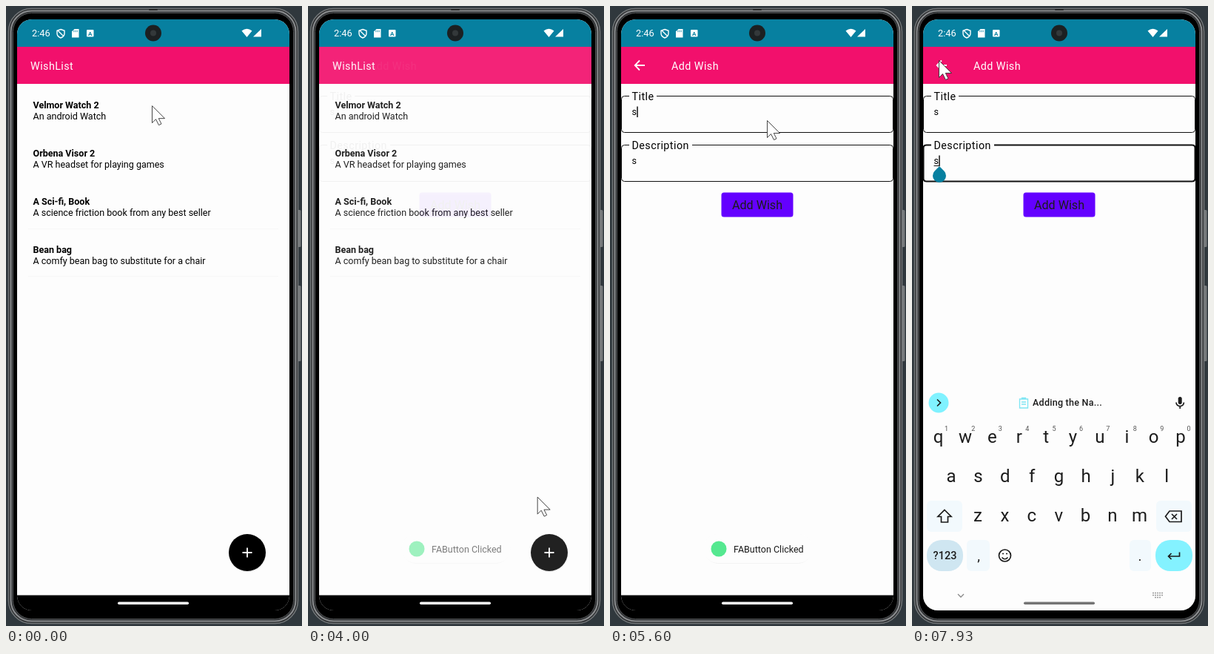
Write an HTML page that moves like this. It is 400 px wide and 836 px high and loops after 8000 ms.

```html
<!DOCTYPE html>
<html lang="en">
<head>
<meta charset="utf-8">
<title>Wish list app</title>
<style>
html, body { margin: 0; width: 100%; height: 100%; overflow: hidden; background: #30383d; }
svg { display: block; width: 400px; height: 836px; font: 12.53px Roboto, sans-serif; }
.body { font-size: 14.3px; letter-spacing: .45px; }
.bar { fill: #f2106c; }
.teal { fill: #0780a0; }
.line { fill: none; stroke: #111; }
.icon { fill: none; stroke: #1c1c1c; stroke-width: 1.7; }
.key { font-size: 24px; text-anchor: middle; fill: #1c1c1c; }
.hint { font-size: 9px; text-anchor: middle; fill: #555; }
</style>
</head>
<body>
<svg viewBox="0 0 400 836">
  <defs><clipPath id="screen"><rect x="15" y="18" width="368" height="797" rx="20"/></clipPath></defs>

  <!-- phone body -->
  <g fill="#777b7d">
    <rect x="393" y="275" width="5.5" height="50" rx="1.5"/>
    <rect x="393" y="377" width="5.5" height="102" rx="1.5"/>
  </g>
  <rect x="3.5" y="3.5" width="391" height="829" rx="31" fill="#242628" stroke="#74787a" stroke-width="1.5"/>
  <rect x="6.5" y="6.5" width="385" height="823" rx="28" fill="#303234" stroke="#8a8c8e" stroke-width="2"/>
  <rect x="9.5" y="9.5" width="379" height="817" rx="25" fill="#000" stroke="#505254"/>
  <rect x="193" y="4" width="12" height="2" rx="1" fill="#222"/>

  <g clip-path="url(#screen)">
    <rect x="15" y="18" width="368" height="797" fill="#fdfdfd"/>
    <g id="list">
      <rect x="15" y="55" width="368" height="740" fill="#fdfdfd"/>
      <rect class="bar" x="15" y="55" width="368" height="50"/>
      <text class="body" x="33" y="85.5" fill="#fff">WishList</text>
      <g id="wishes"></g>
      <path d="M30 300.5H368M30 364.5H368" stroke="#f7f7f7"/>
      <circle cx="326.500" cy="738.500" r="25" fill="#eee"/>
      <circle cx="326" cy="737" r="25"/>
      <path d="M319.5 737h13M326 730.5v13" stroke="#fff" stroke-width="1.8"/>
    </g>
    <g id="form">
      <rect x="15" y="55" width="368" height="740" fill="#fdfdfd"/>
      <rect class="bar" x="15" y="55" width="368" height="50"/>
      <path d="M47 80H34M40 73.5L33.7 80L40 86.5" fill="none" stroke="#fff" stroke-width="1.8"/>
      <text class="body" x="83" y="85.5" fill="#fff">Add Wish</text>
      <g id="fields"></g>
      <rect x="150.500" y="251.500" width="97" height="33" rx="3.500" fill="#6400ff"/>
      <text x="165" y="273.5" font-size="16.1" fill="#1c1c1c">Add Wish</text>
    </g>

    <!-- status bar -->
    <rect class="teal" x="15" y="18" width="368" height="37"/>
    <g fill="#fff">
      <text x="35" y="41" font-size="12.8">2:46</text>
      <path d="M74 31.5L79 33.3V37q0 4-5 6q-5-2-5-6V33.3ZM70 33L78 41" fill="none" stroke="#fff" stroke-width="1.4"/>
      <path d="M92.500 31H98.500V42.500H89V34.500Z"/>
      <rect x="109" y="32" width="9.500" height="9.500" rx="1"/>
      <text class="teal" x="113.700" y="39.800" font-size="8" font-weight="700" text-anchor="middle">A</text>
      <path d="M318.500 33.500Q325.500 28 332.500 33.500L325.500 42ZM345 31V41.500H334Z"/>
    </g>
    <path d="M91.800 32.700v2.500M94 32.700v2.500M96.200 32.700v2.500" stroke="#0780a0" stroke-width=".8"/>
    <circle cx="199" cy="36.500" r="11" fill="#1c2022"/>
    <circle cx="199" cy="36.500" r="4" fill="#33383a"/>

    <rect x="15" y="794.500" width="368" height="21"/>
    <g id="keyboard">
      <rect x="15" y="514" width="368" height="301" fill="#fdfdfd"/>
      <circle cx="36" cy="535" r="13.500" fill="#80f2ff"/>
      <path class="icon" d="M34 530.500L38.500 535L34 539.500"/>
      <path d="M145.500 530h11v12h-11ZM148.500 530v-1.500h5v1.500M148 534h6M148 537h6" fill="none" stroke="#80e6f4" stroke-width="1.4"/>
      <text x="163" y="539" letter-spacing=".25" font-weight="500" fill="#1c1c1c">Adding the Na...</text>
      <rect x="359.700" y="527" width="5" height="10" rx="2.500" fill="#1c1c1c"/>
      <path class="icon" d="M357 534.500a5.200 5.200 0 0 0 10.400 0M362.200 539.500V543"/>
      <g fill="#f2f9fd">
        <rect x="20" y="667" width="48" height="42" rx="6"/>
        <rect x="330" y="667" width="48" height="42" rx="6"/>
        <rect x="74" y="720" width="31" height="42" rx="6"/>
        <rect x="294" y="720" width="29" height="42" rx="6"/>
      </g>
      <rect x="20" y="720" width="49" height="42" rx="20" fill="#cfe6f1"/>
      <rect x="329" y="720" width="50" height="42" rx="20" fill="#84f2ff"/>
      <text x="44.500" y="746" font-size="14.500" font-weight="500" text-anchor="middle" fill="#1c1c1c">?123</text>
      <g id="keys"></g>
      <text class="key" x="90" y="748" style="font-size:19px">,</text>
      <text class="key" x="308" y="748" style="font-size:19px">.</text>
      <path class="icon" d="M44 679.500L53 688.500H48.500V696H39.500V688.500H35Z"/>
      <path class="icon" d="M348 681H364V695.500H348L342.500 688.200ZM351 685L358 692M358 685L351 692"/>
      <path class="icon" d="M361.500 736.500V742H346.500M350.500 738L346.500 742L350.500 746"/>
      <circle class="icon" cx="125.500" cy="741" r="8"/>
      <path class="icon" d="M121.500 743.500q4 4.500 8 0M122 738.500h2M127 738.500h2"/>
      <path d="M62 793L66 797L70 793" fill="none" stroke="#888" stroke-width="1.300"/>
      <path d="M325 791.500H339M325 794.500H339M328 797.500H336" stroke="#999" stroke-width="1.500" stroke-dasharray="2 1"/>
    </g>
    <rect id="pill" x="151" y="803.500" width="96" height="3.500" rx="1.700"/>

    <g id="toast">
      <rect x="127" y="713" width="146" height="39" rx="19.500" fill="#f3f3f3"/>
      <rect x="126" y="712" width="148" height="39" rx="19.500" fill="#fdfdfd"/>
      <circle cx="147" cy="732" r="10.500" fill="#55e890"/>
      <text x="167" y="737" fill="#1c1c1c">FAButton Clicked</text>
    </g>
  </g>
  <path id="cursor" d="M.5 .5V23.500L5.500 18.500L9.500 26.500L13 24.800L9.300 17.500H17.500Z" fill="#fff" stroke="#333" stroke-width=".9"/>
</svg>
<script>
const $ = id => document.getElementById(id);
const LOOP = 8000, TITLE_TAP = 5580, DESC_TAP = 6925;

$('wishes').innerHTML = [
  ['Velmor Watch 2', 'An android Watch'],
  ['Orbena Visor 2', 'A VR headset for playing games'],
  ['A Sci-fi, Book', 'A science friction book from any best seller'],
  ['Bean bag', 'A comfy bean bag to substitute for a chair']
].map(([name, note], i) => `<g transform="translate(36.5 ${138 + 65 * i})">
  <text font-weight="700">${name}</text><text y="14.700">${note}</text></g>`).join('');

$('fields').innerHTML = [['Title', 63], ['Description', 111]].map(([label, gap], i) =>
  `<g transform="translate(0 ${66 * i})">
    <path class="line" d="M26 121.500H19.500q-4 0-4 4V166.500q0 4 4 4H378.500q4 0 4-4V125.500q0-4-4-4H${gap}"/>
    <text class="body" x="29.500" y="127">${label}</text>
    <text x="29.500" y="147">s</text>
    <path class="under" d="M29.500 149.500h7" stroke="#111"/>
    <path class="caret" d="M37 135.500V150" stroke="#111" stroke-width="1.500"/>
    <path class="handle teal" d="M37 150L43.400 156.600A9 9 0 1 1 30.600 156.600Z"/>
  </g>`).join('');

$('keys').innerHTML = [['qwertyuiop', 35.5, 588.5], ['asdfghjkl', 53, 641.5], ['zxcvbnm', 89, 695]]
  .map(([row, x, y], r) => [...row].map((c, i) => {
    const kx = x + 36.4 * i;
    const hint = r ? '' : `<text class="hint" x="${kx + 11}" y="573">${(i + 1) % 10}</text>`;
    return `<text class="key" x="${kx}" y="${y}">${c}</text>${hint}`;
  }).join('')).join('');

const clamp = v => Math.min(1, Math.max(0, v));
const ramp = (t, a, b) => clamp((t - a) / (b - a));

// cubic-bezier(.4, 0, .2, 1), solved by bisection
function ease(x) {
  let lo = 0, hi = 1;
  for (let i = 0; i < 20; i++) {
    const s = (lo + hi) / 2, q = 1 - s;
    if (1.2 * s * q * q + .6 * s * s * q + s ** 3 < x) lo = s; else hi = s;
  }
  return 3 * lo * lo * (1 - lo) + lo ** 3;
}

// time, x, y
const path = [
  [0, 197, 134], [500, 190, 205], [1030, 180, 281], [1900, 180, 281], [1930, 180, 283],
  [2300, 205, 375], [2730, 262, 530], [3130, 293, 633], [3500, 320, 730], [3600, 322, 735],
  [3850, 320, 728], [4230, 294, 561], [4700, 255, 330], [5230, 218, 175], [5560, 212, 154],
  [6150, 212, 154], [6500, 160, 188], [6830, 103, 213], [7050, 97, 214], [7400, 62, 135],
  [7740, 36, 73], [LOOP, 36, 73]
];
function cursorAt(t) {
  const i = path.findIndex(p => p[0] > t);
  const [a, x, y] = path[i - 1], [b, u, v] = path[i], k = ramp(t, a, b);
  return [x + (u - x) * k, y + (v - y) * k];
}

const fields = [...$('fields').children];
const show = (el, on) => el.style.display = on ? '' : 'none';

function draw(t) {
  const fade = ease(ramp(t, 3910, 4610));
  $('list').setAttribute('opacity', (1 - fade) ** 2);
  $('form').setAttribute('opacity', fade);
  $('toast').setAttribute('opacity', ramp(t, 3900, 4080) * (1 - ramp(t, 7770, 7920)));

  const rise = ease(ramp(t, 5720, 6050));
  $('keyboard').setAttribute('transform', `translate(0 ${305 * (1 - rise)})`);
  $('pill').setAttribute('fill', rise < .3 ? '#fff' : t < 7050 ? '#aaa' : '#747474');

  const focus = t < TITLE_TAP ? -1 : t < DESC_TAP ? 0 : 1;
  fields.forEach((f, i) => {
    const on = focus === i, since = t - (i ? DESC_TAP : TITLE_TAP);
    f.querySelector('.line').style.strokeWidth = on ? 1 + ramp(since, 150, 300) : 1;
    show(f.querySelector('.caret'), on && Math.floor(since / 500) % 2 === 0);
    show(f.querySelector('.handle'), on && since > 150);
    show(f.querySelector('.under'), on && i === 1 && since > 150);
  });
  $('cursor').setAttribute('transform', `translate(${cursorAt(t)})`);
}

const start = performance.now();
function tick() {
  draw((performance.now() - start) % LOOP);
  requestAnimationFrame(tick);
}
tick();
</script>
</body>
</html>
```
